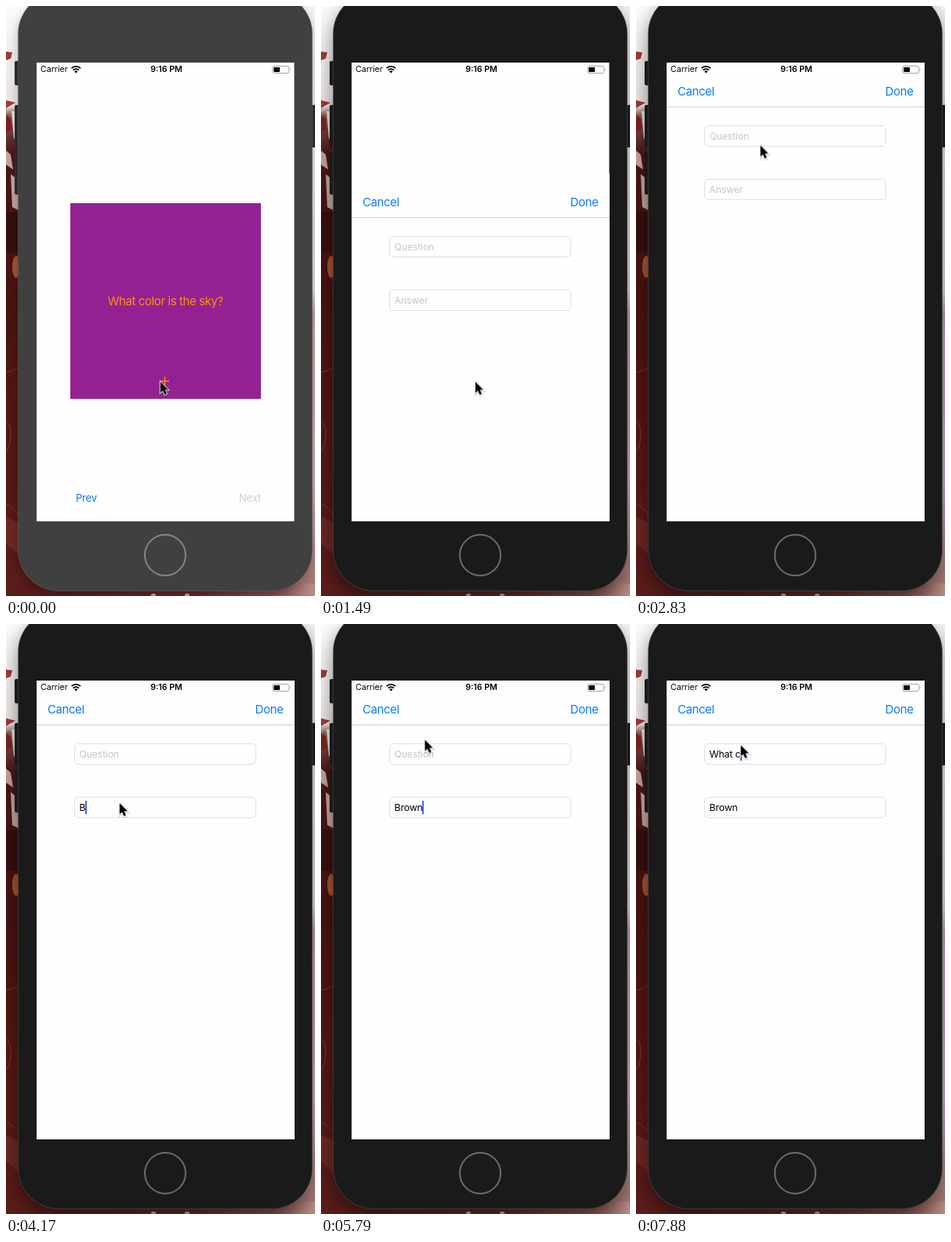
Write an HTML page that moves like this. It is 394 px wide and 751 px high and loops after 8 s.

```html
<!DOCTYPE html>
<html lang="en">
<head>
<meta charset="utf-8">
<title>Flashcard form</title>
<style>
  html, body { margin: 0; width: 100%; height: 100%; overflow: hidden; }
  body { position: relative; background: #fff; font-family: Inter, Roboto, sans-serif; }
  body *, .layer { box-sizing: border-box; }
  .layer, .box, .txt, svg { position: absolute; }
  .layer, svg.layer { left: 0; top: 0; width: 394px; height: 751px; }
  .txt { line-height: 20px; white-space: pre; }
  .anim, .phone, .btn, .home, .plus, .sheet, .cursor {
    animation-duration: 8s; animation-timing-function: step-end; animation-iteration-count: infinite;
  }

  /* device */
  .phone { left: 16px; top: -16px; width: 374px; height: 760px; border-radius: 51px; animation-name: body; }
  .btn { width: 6px; height: 54px; border-radius: 2px 0 0 2px; animation-name: btn; }
  .home { left: 176px; top: 672px; width: 54px; height: 54px; border-radius: 50%; border: 2.5px solid; animation-name: home; }
  @keyframes body {
    0% { background: #404040; box-shadow: 0 0 0 .7px #5a5a5a, 0 6px 14px rgba(0,0,0,.3); }
    16.875%, to { background: #1a1a1a; box-shadow: 0 0 0 .7px #444, 0 10px 24px rgba(0,0,0,.48); }
  }
  @keyframes btn { 0% { background: #303030; } 16.875%, to { background: #202020; } }
  @keyframes home { 0% { border-color: #868686; } 16.875%, to { border-color: #6c6c6c; } }

  /* screen */
  .screen { clip-path: inset(72px 26.5px 95px 39px); background: #fefefe; }
  .card { left: 82px; top: 250.5px; width: 242.5px; height: 249.5px; background: #942192; }
  .ask { left: 82px; width: 242.5px; top: 365.5px; text-align: center; color: #ff9300; }
  .ask, .nav { font-size: 14.9px; letter-spacing: -.024em; }
  .nav { top: 99px; color: #0a7aff; }
  .tool { top: 615.5px; font-size: 13.1px; letter-spacing: -.02em; color: #0a7aff; }
  .status { top: 71px; font-size: 10.6px; color: #000; }
  .plus { animation-name: plus; }
  @keyframes plus { 0% { opacity: 1; } 16.875%, to { opacity: .2; } }

  .sheet { animation-name: rise; }
  .paper { left: 39px; top: 72px; width: 329px; height: 584px; background: #fefefe; }
  .rule { left: 39px; top: 128px; width: 329px; height: 1px; background: #cfcfcf; }
  .field {
    left: 87px; width: 232px; height: 27px; padding-left: 5.5px; border: 1px solid #e0e0e0; border-radius: 5px;
    line-height: 25px; font-size: 12.25px; letter-spacing: -.011em; white-space: pre; color: #000;
  }
  .hint { position: absolute; left: 5.5px; color: #c7c7cd; }
  .caret {
    display: inline-block; width: 1.6px; height: 16.5px; margin: 0 -1px 0 -.4px;
    vertical-align: -4px; background: #4767e6;
  }
  @keyframes rise {
    0% { transform: translateY(600px); }
    18.625% { transform: translateY(141px); }
    20.5% { transform: translateY(36px); }
    22.375% { transform: translateY(8px); }
    24.25%, to { transform: none; }
  }

  .cursor { left: -4px; top: -4px; width: 22px; height: 28px; animation-name: point; }
  @keyframes point {
    0% { transform: translate(196.8px, 478.3px); }
    31.625% { transform: translate(190px, 410px); }
    33.5% { transform: translate(171px, 246px); }
    35.375% { transform: translate(158.6px, 177.5px); }
    37.25% { transform: translate(151px, 187px); }
    39.125% { transform: translate(147px, 212px); }
    40.875% { transform: translate(145px, 225px); }
    42.75% { transform: translate(144.8px, 228px); }
    63.25% { transform: translate(144px, 188px); }
    65.125% { transform: translate(139.8px, 134.3px); }
    67% { transform: translate(130px, 127.5px); }
    68.75% { transform: translate(123.5px, 130px); }
    70.625% { transform: translate(127px, 139px); }
    72.375% { transform: translate(132.5px, 147.5px); }
    78% { transform: translate(133.2px, 152px); }
    79.875%, to { transform: translate(133.6px, 154.3px); }
  }
</style>
</head>
<body>

<!-- wallpaper -->
<svg class="layer" viewBox="0 0 394 751">
  <defs>
    <linearGradient id="left" x2="0" y2="1">
      <stop offset="0" stop-color="#fbfbfb"/>
      <stop offset=".17" stop-color="#eae4e2"/>
      <stop offset=".185" stop-color="#8c5a55"/>
      <stop offset=".25" stop-color="#4a1715"/>
      <stop offset=".5" stop-color="#481311"/>
      <stop offset=".72" stop-color="#551715"/>
      <stop offset="1" stop-color="#5a1d1a"/>
    </linearGradient>
    <linearGradient id="right" x2="0" y2="1">
      <stop offset="0" stop-color="#f4f4f4"/>
      <stop offset=".48" stop-color="#e2e0e0"/>
      <stop offset=".52" stop-color="#c4a5a1"/>
      <stop offset=".8" stop-color="#cdb3af"/>
      <stop offset="1" stop-color="#a1716b"/>
    </linearGradient>
    <linearGradient id="foot">
      <stop offset="0" stop-color="#5a1d1a"/>
      <stop offset=".55" stop-color="#6c2925"/>
      <stop offset=".85" stop-color="#8d514b"/>
      <stop offset="1" stop-color="#b98d87"/>
    </linearGradient>
  </defs>
  <rect width="200" height="751" fill="url(#left)"/>
  <rect x="200" width="194" height="751" fill="url(#right)"/>
  <path d="M60 735H394V751H60Z" fill="url(#foot)"/>
  <path d="M0 58l8 1-2 8-6 2zM0 120l12 3-12 7z" fill="#a03a37"/>
  <path d="M0 139l6 4 1 14-7 5z" fill="#7b2220"/>
  <path d="M7 134h9v42l-6-8z" fill="#e6dcd9"/>
  <path d="M0 184l6 5 3 19-9-6zM6 214l10 8v38l-8-4z" fill="#c2a49c"/>
  <path d="M0 262h16v52H0z" fill="#36100e"/>
  <ellipse cx="13" cy="332" rx="5" ry="14" fill="#a5532f"/>
  <g fill="none" stroke="#7c3631" stroke-width="1">
    <path d="M0 466q9-1 16-6M0 528q7 6 6 20t-6 20M0 634q10 4 16 14"/>
  </g>
  <path d="M0 650l16 8v40L0 684z" fill="#6d2723"/>
  <circle cx="188" cy="751" r="3.2" fill="#b9b5b4"/>
  <circle cx="231" cy="751" r="3.2" fill="#b9b5b4"/>
</svg>

<!-- device -->
<div class="box btn" style="left:11px;top:70px;height:31px"></div>
<div class="box btn" style="left:11px;top:126px"></div>
<div class="box btn" style="left:11px;top:186px"></div>
<div class="box btn" style="left:388px;top:126px"></div>
<div class="box phone"></div>
<div class="box home"></div>

<div class="layer screen">
  <div class="box card"></div>
  <div class="txt ask">What color is the sky?</div>
  <svg class="layer plus" viewBox="0 0 394 751">
    <path d="M197 477.5h11M202.5 472v11" stroke="#ff9300" stroke-width="1.5"/>
  </svg>
  <div class="txt tool" style="left:89px">Prev</div>
  <div class="txt tool" style="left:297px;color:#d0d0d0">Next</div>

  <div class="layer sheet">
    <div class="box paper"></div>
    <div class="txt nav" style="left:53px">Cancel</div>
    <div class="txt nav" style="right:40.5px">Done</div>
    <div class="box rule"></div>
    <div class="box field" id="question" style="top:152px"><span class="hint">Question</span><span class="val"></span><i class="caret"></i></div>
    <div class="box field" id="answer" style="top:219.5px"><span class="hint">Answer</span><span class="val"></span><i class="caret"></i></div>
  </div>

  <div class="txt status" style="left:44px">Carrier</div>
  <div class="txt status" style="left:154px;width:101px;text-align:center;font-weight:600">9:16 PM</div>
  <svg class="layer" viewBox="0 0 394 751">
    <g fill="none" stroke="#000" stroke-width="1.8">
      <path d="M83.6 79.2a8 8 0 0 1 11.4 0M85.7 81.6a5 5 0 0 1 7.2 0"/>
    </g>
    <path d="M87.2 83.2a3 3 0 0 1 4.2 0l-2.1 2.3z"/>
    <rect x="340" y="76.5" width="20.8" height="9" rx="2" fill="none" stroke="#999" stroke-width=".9"/>
    <rect x="341.4" y="77.9" width="7.8" height="6.2" rx=".8"/>
    <path d="M361.9 79.4q1.4 1.6 0 3.2z" fill="#999"/>
  </svg>
</div>

<svg class="cursor" viewBox="-4 -4 22 28">
  <path id="arrow" d="M0 0V14.2L3.2 11.3L5.5 16.6L8.1 15.5L5.9 10.3H10.2Z" transform="translate(.5 1.3)" fill="none" stroke="#000" stroke-opacity=".14" stroke-width="3"/>
  <path d="M0 0V14.2L3.2 11.3L5.5 16.6L8.1 15.5L5.9 10.3H10.2Z" stroke="#fff" stroke-width="1.7" paint-order="stroke"/>
</svg>

<script>
  const LOOP = 8000;
  // [time, typed text]
  const typed = {
    answer: [[0, ''], [4170, 'B'], [4320, 'Br'], [4470, 'Bro'], [4610, 'Brow'], [4760, 'Brown']],
    question: [[0, ''], [6980, 'W'], [7280, 'Wh'], [7430, 'Wha'], [7580, 'What '], [7880, 'What c']]
  };
  const focus = [[0, ''], [3420, 'answer'], [6390, 'question']];
  const at = (keys, t) => keys.findLast(k => k[0] <= t)[1];

  function render(t) {
    const active = at(focus, t);
    for (const id in typed) {
      const field = document.getElementById(id);
      const text = at(typed[id], t);
      const val = field.querySelector('.val');
      if (val.textContent !== text) val.textContent = text;
      field.querySelector('.hint').style.visibility = text ? 'hidden' : 'inherit';
      field.querySelector('.caret').style.visibility = active === id ? 'inherit' : 'hidden';
    }
  }

  let start;
  function tick(now) {
    start ??= now;
    render((now - start) % LOOP);
    requestAnimationFrame(tick);
  }
  render(0);
  requestAnimationFrame(tick);
</script>
</body>
</html>
```
